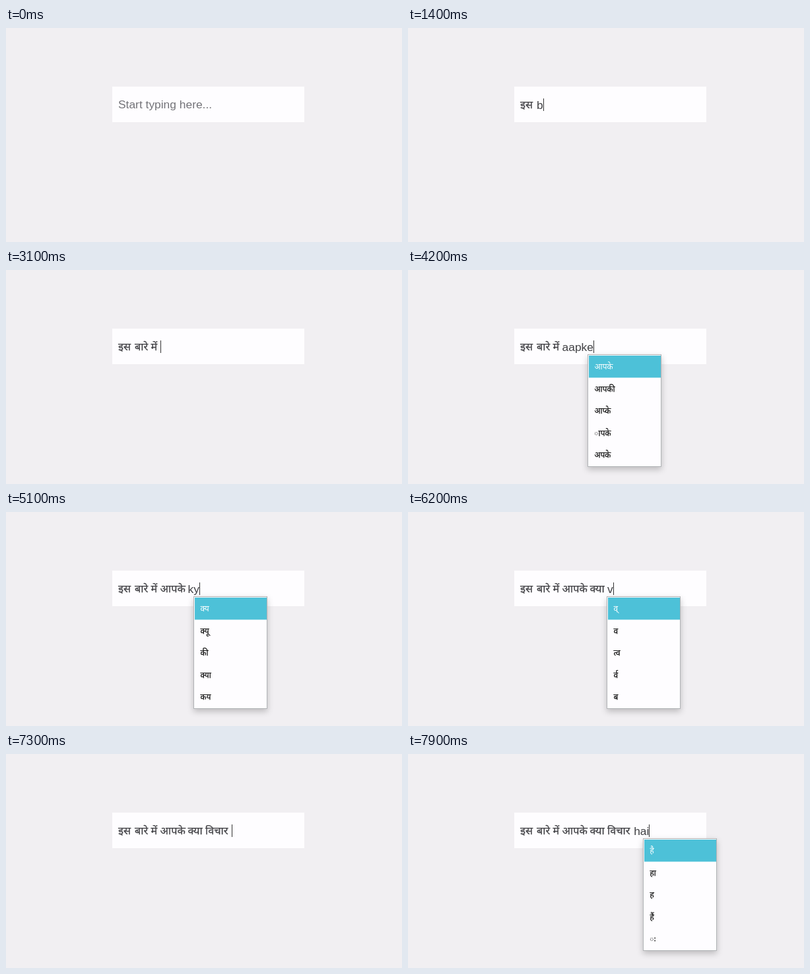
These frames come from a looping animation (600 px wide and 325 px high, 8000 ms). An HTML page:

```html
<!DOCTYPE html>
<html lang="hi">
<head>
<meta charset="utf-8">
<title>Transliteration input</title>
<style>
  html, body { margin: 0; width: 100%; height: 100%; overflow: hidden; background: #f1eff2; }
  svg { display: block; width: 600px; height: 325px; }
  .latin { font: 17.4px "Liberation Sans", Arial, sans-serif; }
  .hindi { font: 16.3px "Noto Sans Devanagari", "Noto Sans", sans-serif; stroke-width: .25px; }
  .line { fill: #414145; }
  .hindi.line { stroke: #414145; }
  #hint { fill: #737378; }
  #caret { fill: #333; }
  #popup { filter: drop-shadow(0 4px 5px rgba(0, 0, 0, .22)); }
  #popup text { font-size: 11.9px; fill: #111; stroke: #111; }
  #popup text:first-of-type { fill: #fff; stroke: none; }
</style>
</head>
<body>
<svg viewBox="0 0 600 325">
  <rect width="600" height="325" fill="#f1eff2"/>
  <rect x="161" y="89" width="291" height="54" fill="#fefdff"/>
  <text id="hint" class="latin" x="170" y="122">Start typing here...</text>
  <g id="words"></g>
  <text id="typed" class="latin line" y="123"></text>
  <rect id="caret" y="107" width="1" height="19"/>
  <g id="popup">
    <rect x=".5" y="128.5" width="111" height="170" fill="#fefdff" stroke="#b1b4b6"/>
    <rect x="2" y="130" width="109" height="33.5" fill="#4dc1d8"/>
  </g>
</svg>
<script>
const LOOP = 8000;
const POPUP_DELAY = 100;

// Each key: time, letters so far, suggestions.
const words = [
  { x: 170, text: 'इस', done: 1000, keys: [
    [500, 'i', 'इ ई ि ी आई'],
    [700, 'is', 'इस ईस इश ईश िस']] },
  { x: 195, text: 'बारे', done: 2200, keys: [
    [1400, 'b', 'ब् ब भ बी बि'],
    [1600, 'ba', 'बा ब भा बे बै'],
    [1700, 'baa', 'बा बाा भा बआ ब'],
    [1900, 'baar', 'बार बाड़ भार बर बारे'],
    [2000, 'baare', 'बारे बाड़े भारे बरे बारें']] },
  { x: 219.5, text: 'में', done: 3100, keys: [
    [2600, 'm', 'म् म मा मी मे'],
    [2800, 'me', 'में मे मै मैं मी']] },
  { x: 233.6, text: 'आपके', done: 4300, keys: [
    [3400, 'a', 'अ आ ा ए ऐ'],
    [3600, 'aa', 'आ ा अ आअ आा'],
    [3800, 'aap', 'आप आप् ाप अप आपा'],
    [4000, 'aapk', 'आपक आप्क आपके ापक अपक'],
    [4100, 'aapke', 'आपके आपकी आप्के ापके अपके']] },
  { x: 275.5, text: 'क्या', done: 5600, keys: [
    [4700, 'k', 'क् क के की का'],
    [5000, 'ky', 'क्य क्यू की क्या कय'],
    [5300, 'kya', 'क्या क्य किया कया क्यों']] },
  { x: 302, text: 'विचार', done: 7300, keys: [
    [5800, 'v', 'व् व त्व र्व ब'],
    [6300, 'vi', 'वि वी बि वई व'],
    [6400, 'vic', 'विच विक वीच विस विच्'],
    [6500, 'vich', 'विच विछ वीच विच् बिच'],
    [6600, 'vicha', 'विचा विच विछा वीचा विचार'],
    [6700, 'vichaa', 'विचा विछा वीचा विचार विच'],
    [6900, 'vichaar', 'विचार विचर वीचार विछार बिचार']] },
  { x: 342.2, text: 'है', done: LOOP, keys: [
    [7500, 'h', 'ह् ह हा ही हे'],
    [7700, 'ha', 'हा ह है हां हाँ'],
    [7900, 'hai', 'है हा ह हैं ः']] }
];

const byId = id => document.getElementById(id);
const hint = byId('hint'), typed = byId('typed'), caret = byId('caret'), popup = byId('popup');

function addText(parent, x, y, kind, text = '') {
  const node = document.createElementNS('http://www.w3.org/2000/svg', 'text');
  node.setAttribute('x', x);
  node.setAttribute('y', y);
  node.setAttribute('class', kind);
  node.textContent = text;
  return parent.appendChild(node);
}

const show = (node, visible) => node.setAttribute('visibility', visible ? 'visible' : 'hidden');
const wordNodes = words.map(w => addText(byId('words'), w.x, 122.4, 'hindi line', w.text));
const rows = Array.from({ length: 5 }, (_, i) => addText(popup, 10.5, 151 + i * 33.5, 'hindi'));

function draw(t) {
  const current = words.find(w => t < w.done);
  const key = current.keys.filter(k => k[0] <= t).pop();
  const started = t >= words[0].keys[0][0];

  show(hint, !started);
  show(caret, started);
  words.forEach((w, i) => show(wordNodes[i], t >= w.done));

  typed.setAttribute('x', current.x);
  typed.textContent = key ? key[1] : '';
  const end = current.x + (key ? typed.getComputedTextLength() : 0);
  caret.setAttribute('x', Math.round(end));

  show(popup, key && t >= current.keys[0][0] + POPUP_DELAY);
  popup.setAttribute('transform', `translate(${Math.floor(end - 8.8)} 0)`);
  const options = key ? key[2].split(' ') : [];
  rows.forEach((row, i) => { row.textContent = options[i] || ''; });
}

let start;
function tick(now) {
  start ??= now;
  draw((now - start) % LOOP);
  requestAnimationFrame(tick);
}
draw(0);
requestAnimationFrame(tick);
</script>
</body>
</html>
```
